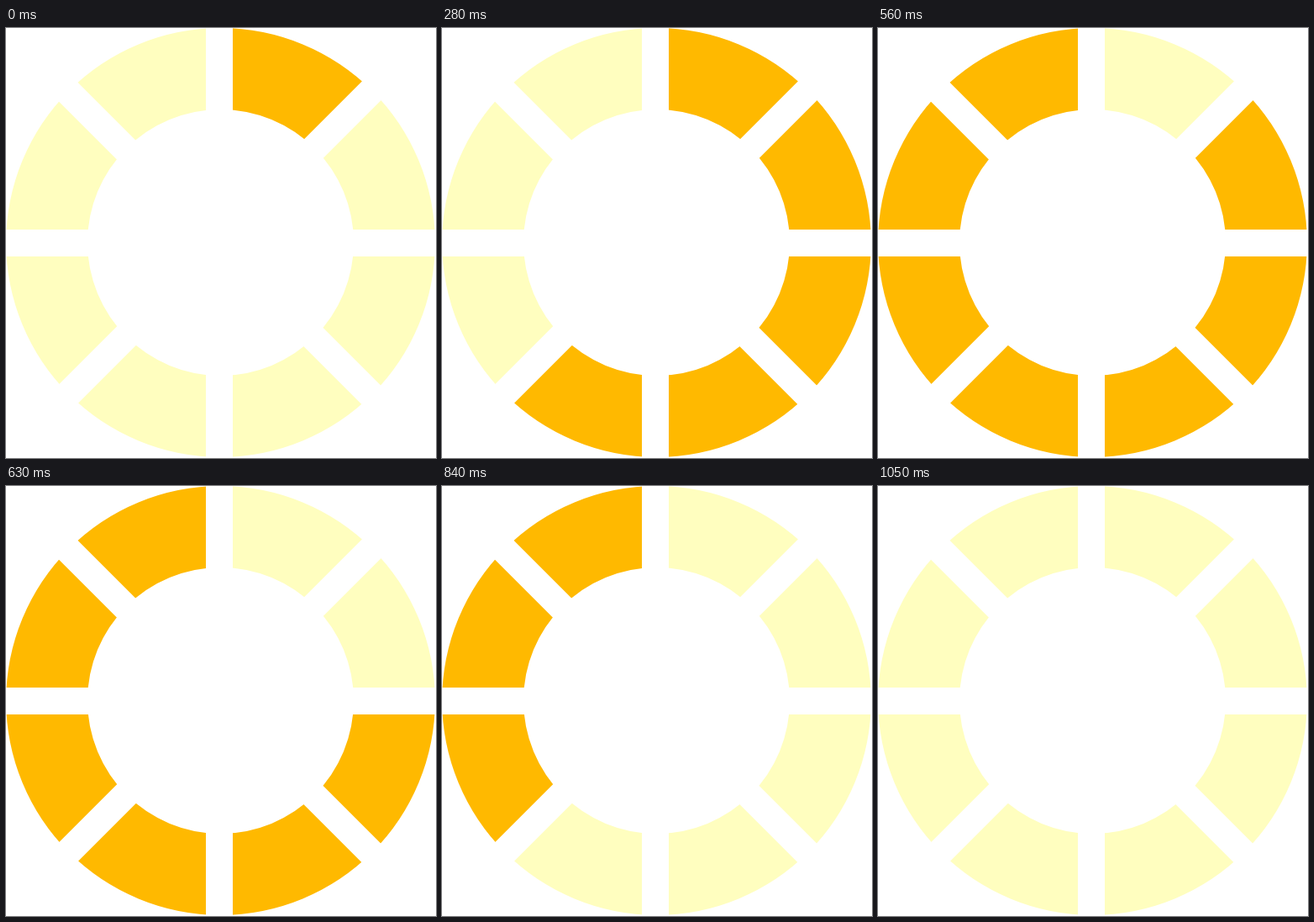
Write an HTML page with a canvas that moves like this. It is 512x512 px and loops after 1120 ms.

```html
<!DOCTYPE html>
<html lang="en">
<head>
<meta charset="utf-8">
<title>Loading ring</title>
<style>
html, body { margin: 0; width: 100%; height: 100%; overflow: hidden; background: #fff; }
canvas { display: block; width: 512px; height: 512px; }
</style>
</head>
<body>
<canvas id="ring" width="512" height="512"></canvas>
<script>
const ctx = document.getElementById('ring').getContext('2d');
const STEP = 70, COUNT = 8, SLICE = Math.PI / 4;
const ON = '#ffb900', OFF = '#fffebf';
const CENTER = 255.5, OUTER = 255.4, INNER = 158.5;

function segment(i, color) {
  const start = i * SLICE - Math.PI / 2;
  ctx.beginPath();
  ctx.arc(CENTER, CENTER, OUTER, start, start + SLICE);
  ctx.arc(CENTER, CENTER, INNER, start + SLICE, start, true);
  ctx.fillStyle = color;
  ctx.fill();
}

// White bars cut the ring into eight blocks.
function gap(angle) {
  ctx.save();
  ctx.translate(254, 256);
  ctx.rotate(angle);
  ctx.fillStyle = '#fff';
  ctx.fillRect(-300, -16, 600, 32);
  ctx.restore();
}

function draw(time) {
  const step = Math.floor(time / STEP) % (2 * COUNT);
  const filling = step < COUNT;
  const reached = step % COUNT;
  ctx.fillStyle = '#fff';
  ctx.fillRect(0, 0, 512, 512);
  for (let i = 0; i < COUNT; i++) {
    segment(i, (i <= reached) === filling ? ON : OFF);
  }
  for (let i = 0; i < COUNT / 2; i++) gap(i * SLICE);
}

const begin = performance.now();
function tick() {
  draw(performance.now() - begin);
  requestAnimationFrame(tick);
}
tick();
</script>
</body>
</html>
```
